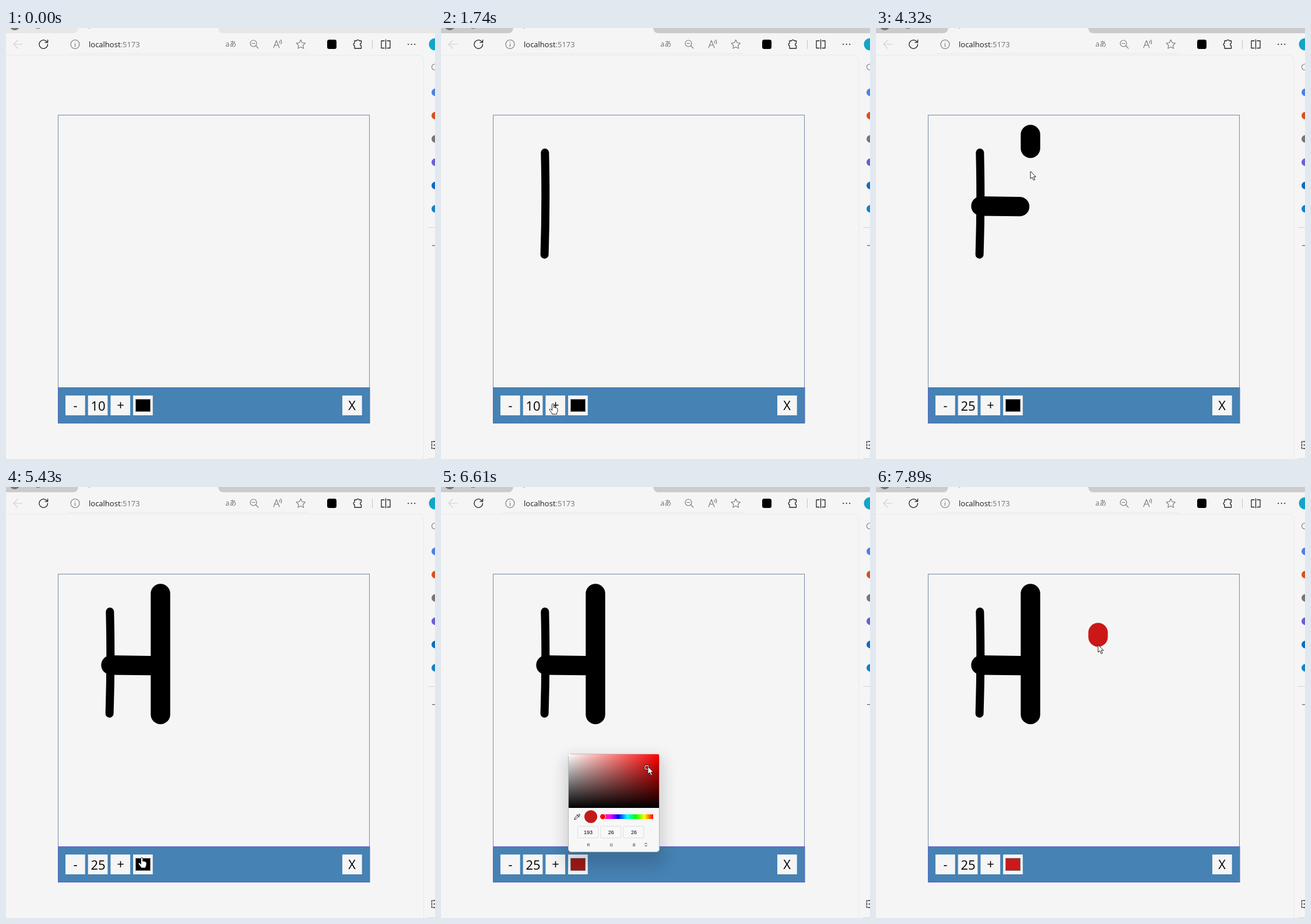
Animation, 736 px wide and 740 px high, one loop 8 s. Source, as an HTML page:

```html
<!DOCTYPE html>
<html lang="en">
<head>
<meta charset="utf-8">
<title>Drawing app</title>
<style>
  html, body { margin: 0; width: 100%; height: 100%; overflow: hidden; background: #f5f5f5; }
  svg { display: block; width: 736px; height: 740px; }
  text { font-family: "Open Sans", "Noto Sans", sans-serif; }
  .icon { fill: none; stroke: #757575; stroke-width: 1.1; stroke-linecap: round; stroke-linejoin: round; }
  .dark { stroke: #222; stroke-width: 1.3; }
  .thin { stroke-width: 1; }
  .cjk { font-family: "Noto Sans", "Noto Sans CJK JP", sans-serif; }
  .label { font-size: 22px; text-anchor: middle; }
  .field { font: 9px "Liberation Sans", Arial, sans-serif; text-anchor: middle; }
  .unit { font: 7px "Liberation Sans", Arial, sans-serif; text-anchor: middle; fill: #333; }
  .pen { fill: none; stroke-linecap: round; }
</style>
</head>
<body>
<svg viewBox="0 0 736 740">
  <defs>
    <linearGradient id="sat"><stop stop-color="#fff"/><stop offset="1" stop-color="#fff" stop-opacity="0"/></linearGradient>
    <linearGradient id="val" x2="0" y2="1"><stop stop-opacity="0"/><stop offset="1"/></linearGradient>
    <linearGradient id="hue"/>
    <filter id="soft" x="-50%" y="-50%" width="200%" height="200%"><feGaussianBlur stdDeviation="13"/></filter>
  </defs>
  <rect width="736" height="740" fill="#f5f5f5"/>

  <!-- browser bar -->
  <path id="tabs" d="M0 0H124Q123 9 115 9H0ZM364 0Q365 9 373 9H736V0Z"/>
  <circle cx="15" cy="-5" r="9" fill="#757575"/>
  <path class="icon" d="M52 0Q55 1.6 58 0M142 0H144"/>
  <path fill="none" stroke="#e9e9ef" d="M0 46.5H706Q716.5 46.5 716.5 57V740M105 43.5H520"/>
  <path class="icon" style="stroke:#d0d0d0" d="M28 28H13M20 21L13 28L20 35"/>
  <g class="icon dark">
    <path d="M71.5 28A7.3 7.3 0 1 1 69 22.5L71.3 24.7M71.6 20.3V24.9H67"/>
    <path d="M598 22H601.5A2.4 2.4 0 0 1 606 22H609.5V26A2.3 2.3 0 0 0 609.5 30.5V35H598V30.5A2.3 2.3 0 0 1 598 26Z"/>
    <path d="M649 22H644V34.5H649M654 22H659V34.5H654M651.5 20V36"/>
  </g>
  <g class="icon">
    <circle cx="118.5" cy="28" r="7.5"/>
    <path d="M118.5 27V32M118.5 24.3V24.5"/>
    <circle cx="424.5" cy="26.5" r="5.5"/>
    <path d="M428.5 30.5L433 35M422 26.5H427"/>
    <path d="M459 34L464 21.5L469 34M461 29.5H467M469 22.5Q470.5 24 469.5 26M471 20.5Q474 23.5 472 27.5"/>
    <path id="star"/>
  </g>
  <text x="142" y="33" font-size="13" fill="#1b1b1b">localhost<tspan fill="#727272">:5173</tspan></text>
  <text class="cjk" x="376.5" y="32" font-size="12" fill="#757575">aあ</text>
  <rect x="551" y="20" width="16" height="16" rx="3.5"/>
  <path stroke="#c4c4c4" d="M628.5 20V36"/>
  <path stroke="#222" stroke-width="2.2" stroke-linecap="round" stroke-dasharray="0 5.5" d="M690.2 28H702"/>

  <!-- side bar -->
  <circle cx="736" cy="28" r="10.5" fill="#12a5c8"/>
  <circle class="icon" cx="735.5" cy="67" r="5"/>
  <g id="side"></g>
  <path stroke="#d6d6d6" d="M724 342.5H736M724 739.5H736"/>
  <path stroke="#666" stroke-width="1.3" d="M731 373.5H736"/>
  <path class="icon dark" stroke-dasharray="3 2" d="M736 710H730.5V722H736M734 716H736"/>

  <!-- app -->
  <rect x="89.5" y="149.5" width="534" height="468" fill="none" stroke="#7689a8"/>
  <rect x="89.5" y="617.5" width="534.5" height="61" fill="#4682b4" stroke="#5a62c4"/>
  <g id="buttons" fill="#f5f5f5"></g>
  <text class="label" x="119" y="656">-</text>
  <text class="label" id="size" x="158" y="656.5"></text>
  <text class="label" x="196.5" y="655">+</text>
  <text class="label" x="593.7" y="655.5">X</text>
  <rect id="swatch" x="222.5" y="637.5" width="25" height="21" stroke="#767676"/>
  <g id="ink"></g>

  <!-- colour popup -->
  <g id="popup">
    <rect x="212" y="464" width="170" height="186" rx="8" opacity=".15" filter="url(#soft)"/>
    <rect x="218.5" y="458.5" width="156" height="168" rx="5" fill="#f7f7f7" stroke="#b9b9b9"/>
    <g id="shade"></g>
    <g id="ring" fill="none"><circle r="4.6" stroke="#111"/><circle r="3.6" stroke="#fff"/></g>
    <path class="icon dark thin" d="M229 570.5L229.5 568L234 563.5L236 565.5L231.5 570ZM233 562.5L237 566.5M235 563.5L237 561.5Q239 562 238 564L236.5 565.5"/>
    <circle id="sample" cx="257" cy="566" r="11"/>
    <rect x="274" y="562" width="90" height="8" fill="url(#hue)"/>
    <circle cx="277.5" cy="566" r="5" fill="#f00" stroke="#fff"/>
    <g id="rgb"></g>
    <path class="icon dark thin" d="M349.8 612.8L351.5 611L353.2 612.8M349.8 615.2L351.5 617L353.2 615.2"/>
  </g>

  <g id="cursor" fill="#fff" stroke="#222" stroke-linejoin="round">
    <path id="arrow" d="M0 0V12.8L3 10.2L5.3 15.2L7.5 14.2L5.3 9.4H9.2Z"/>
    <path id="hand" d="M-1.5 1Q0 -1 1.5 1V6.5Q3 5.5 4 7Q5.5 6.2 6.3 7.7Q8 7.4 8 9.5V12Q8 14 6.5 16.5V18H-1.5V16.5L-5.5 11.5Q-6.5 9.5 -5 9Q-3.8 9 -1.5 11.5Z"/>
  </g>
</svg>
<script>
const LOOP = 8000, STEP = 110, PHASE = 20; // ms; the screen refreshes once per STEP
const LAG = 90;                            // ink and swatch trail the pointer
const PICKER = { x: 219, y: 459, width: 155, height: 92 };
const DRAG = 6230, OPEN = 5630, CLOSE = 7290;

const $ = id => document.getElementById(id);
const clamp = (v, lo, hi) => Math.min(hi, Math.max(lo, v));
const show = (el, on) => { el.style.display = on ? "" : "none"; };
const add = (parent, tag, attrs, text = "") => {
  const el = document.createElementNS("http://www.w3.org/2000/svg", tag);
  for (const k in attrs) el.setAttribute(k, attrs[k]);
  el.textContent = text;
  return $(parent).appendChild(el);
};
const moveTo = (id, [x, y]) => $(id).setAttribute("transform", `translate(${x} ${y})`);

const strokes = [
  { from: [178.3, 214], via: [180.5, 300], to: [177.6, 389], start: 540, end: 1250, width: 14 },
  { from: [180, 305.7], to: [246.5, 306.6], start: 3230, end: 3700 },
  { from: [265, 183], to: [265, 390.5], start: 4166, end: 4640 },
  { from: [381, 250], to: [381, 257.5], start: 7710, end: 7740, color: "#cc1718" }
];

// Pointer stops between the strokes: time, x, y
const route = [
  [90, 330, 105],
  [1670, 192, 645], [2500, 192, 645],                  // size button
  [3210, 178, 306],
  [5410, 233, 636], [5700, 233, 636],                  // swatch
  [DRAG, 352, 512], [6510, 355, 480], [6840, 358, 476], // picker
  [CLOSE, 428, 400],
  [7830, 381, 271],
  ...strokes.flatMap(s => [[s.start, ...s.from], [s.end, ...s.to]])
].sort((a, b) => a[0] - b[0]);

function pointer(t) {
  const i = clamp(route.findIndex(k => k[0] > t), 1, route.length - 1);
  const [a, b] = t >= LOOP - STEP || t >= route.at(-1)[0] ? [route.at(-1), route.at(-1)] : [route[i - 1], route[i]];
  const p = clamp((t - a[0]) / (b[0] - a[0] || 1), 0, 1);
  return [a[1] + (b[1] - a[1]) * p, a[2] + (b[2] - a[2]) * p];
}

function ring(t) {
  if (t < DRAG) return [PICKER.x, PICKER.y + PICKER.height];
  const [x, y] = pointer(Math.min(t, 6840));
  return [x - 2, y + 1.5];
}

// Position in the picker to red, green, blue
function pick(t) {
  const [x, y] = ring(t);
  const red = 255 * (1 - (y - PICKER.y) / PICKER.height);
  const rest = red * (1 - (x - PICKER.x) / PICKER.width);
  return [red, rest, rest].map(Math.round);
}

// Static parts
$("star").setAttribute("d", "M" + Array.from({ length: 10 }, (_, i) => {
  const a = i * Math.PI / 5, r = i % 2 ? 4 : 8.2;
  return `${505.7 + r * Math.sin(a)} ${28.5 - r * Math.cos(a)}`;
}).join("L") + "Z");
["#4f7fe3", "#d8511d", "#777", "#6a5fd0", "#0f6cbd", "#1580c4"].forEach((fill, i) =>
  add("side", "circle", { cx: 736.5, cy: 110.5 + 40 * i, r: 6.5, fill }));
for (const x of [0, 1, 2, 3].map(i => 102 + 38.7 * i).concat(577))
  add("buttons", "rect", { x, y: 631, width: 33.7, height: 34 });
for (const fill of ["#f00", "url(#sat)", "url(#val)"]) add("shade", "rect", { ...PICKER, fill });
for (let i = 0; i <= 6; i++)
  add("hue", "stop", { offset: i / 6, "stop-color": `hsl(${360 - 60 * i} 100% 50%)` });

const digits = [..."RGB"].map((name, i) => {
  const x = 252.5 + 39.2 * i;
  add("rgb", "rect", { x: x - 18, y: 582.5, width: 35, height: 20, rx: 2, fill: "#f8f8f8", stroke: "#dedede" });
  add("rgb", "text", { class: "unit", x: x + 0.5, y: 617 }, name);
  return add("rgb", "text", { class: "field", x, y: 596 });
});

for (const s of strokes)
  s.el = add("ink", "path", {
    class: "pen", d: `M${s.from}Q${s.via || s.from} ${s.to}`, pathLength: 1,
    stroke: s.color || "#000", "stroke-width": s.width || 33.4
  });

function draw(now) {
  const t = Math.floor((now - PHASE) / STEP) * STEP + PHASE;
  const clicks = clamp(Math.floor((t - 1620) / 220), 0, 3);
  $("size").textContent = 10 + 5 * clicks;
  $("tabs").setAttribute("fill", t < strokes[0].start ? "#e7e7e7" : "#cbcbcb");

  for (const s of strokes) {
    const p = (t - LAG - s.start) / (s.end - s.start);
    show(s.el, p >= 0);
    s.el.setAttribute("stroke-dasharray", p < 1 ? `${Math.max(p, 0.001)} 3` : "none");
  }

  $("swatch").setAttribute("fill", `rgb(${pick(t - LAG)})`);
  show($("popup"), t >= OPEN && t < CLOSE);
  const color = pick(t);
  $("sample").setAttribute("fill", `rgb(${color})`);
  digits.forEach((el, i) => { el.textContent = color[i]; });
  moveTo("ring", ring(t));

  const [x, y] = pointer(t);
  const onButton = y > 631 && x < 252;
  show($("cursor"), t >= route[0][0]);
  show($("hand"), onButton);
  show($("arrow"), !onButton);
  moveTo("cursor", [x, y]);
}

const start = performance.now();
function frame() {
  draw((performance.now() - start) % LOOP);
  requestAnimationFrame(frame);
}
frame();
</script>
</body>
</html>
```
